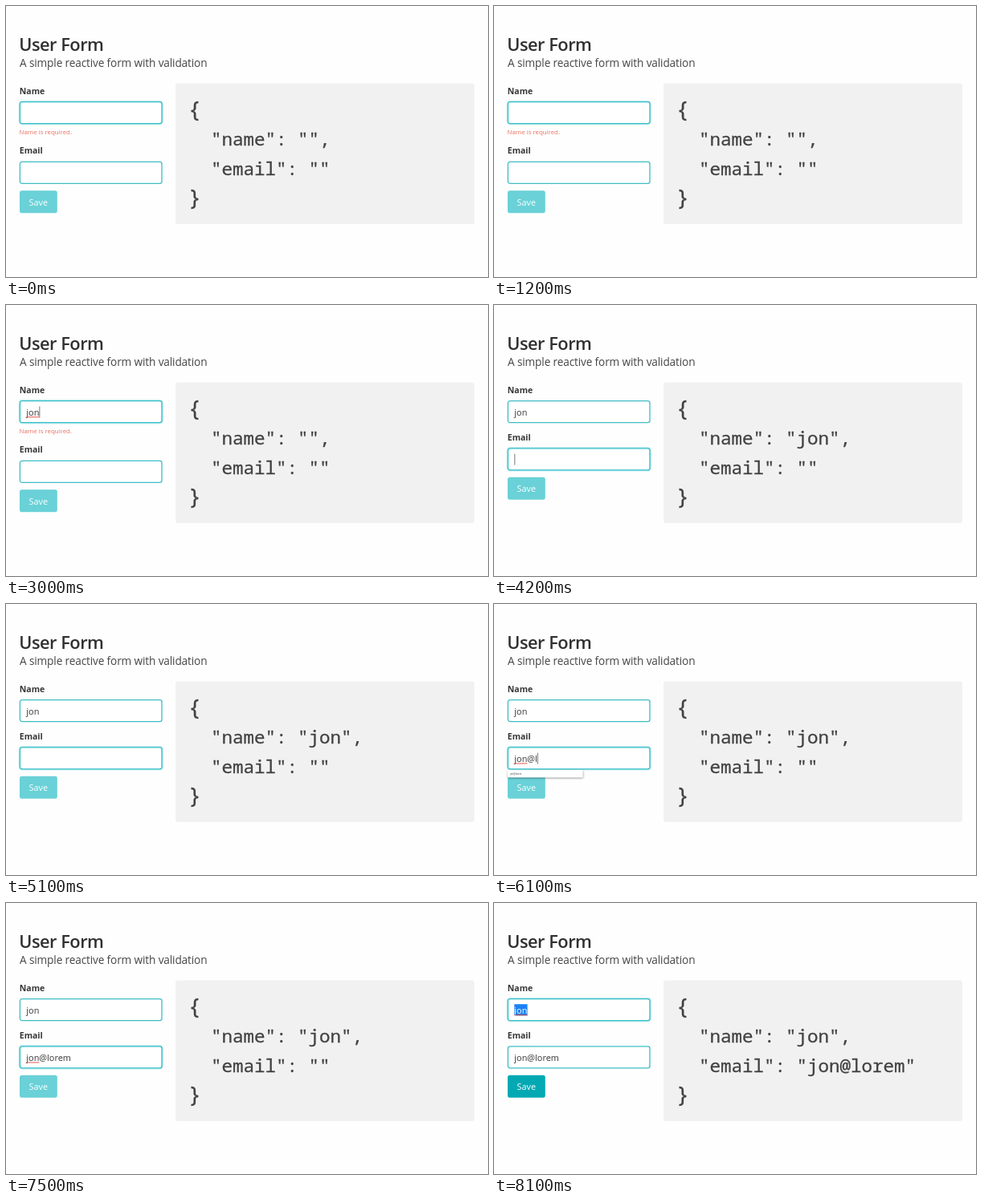
An HTML page that plays this animation: 600x338 px, repeating every 8200 ms.

```html
<!DOCTYPE html>
<html lang="en">
<head>
<meta charset="utf-8">
<title>User Form</title>
<style>
  html, body { margin: 0; width: 100%; height: 100%; overflow: hidden; background: #fefefe; }
  svg { display: block; width: 100vw; height: 100vh; }
  text { font-family: "Open Sans", "Noto Sans", sans-serif; fill: #363636; white-space: pre; }
  .title { font-size: 21.8px; font-weight: 600; letter-spacing: -0.48px; fill: #303030; }
  .subtitle { font-size: 13.6px; letter-spacing: -0.12px; fill: #454545; }
  .label { font-size: 10.5px; font-weight: 700; }
  .value { font-size: 10.9px; }
  .error { font-size: 7.9px; fill: #e8705f; }
  .save { font-size: 10.8px; fill: #fff; }
  .hint { font-size: 2.8px; }
  .code text {
    font: 22.5px "Noto Sans Mono", "DejaVu Sans Mono", monospace;
    fill: #424242; stroke: #424242; stroke-width: .3;
  }
  .code .brace { font-size: 26.5px; text-anchor: middle; }
  .box { fill: #fff; stroke: #3fbcc5; stroke-width: 1.3; }
  .ring { fill: none; stroke: #12b8c4; stroke-opacity: .24; stroke-width: 2.8; }
  .focus .box { stroke: #2fbdc7; }
  .wave { fill: none; stroke: #e0453c; stroke-width: .9; }
  .caret { stroke: #555; stroke-width: .8; }
</style>
</head>
<body>
<svg viewBox="0 0 600 338" preserveAspectRatio="none">
  <defs>
    <filter id="shadow" x="-10%" y="-50%" width="120%" height="250%">
      <feDropShadow dx=".4" dy="1" stdDeviation="1.2" flood-opacity=".5"/>
    </filter>
  </defs>
  <rect width="600" height="338" fill="#fefefe"/>
  <text class="title" x="16.2" y="55.6">User Form</text>
  <text class="subtitle" x="17" y="76.2">A simple reactive form with validation</text>

  <text class="label" x="16.8" y="109.5">Name</text>
  <g id="name" transform="translate(17 119.2)"></g>
  <text class="error" id="error" x="16.5" y="159.6">Name is required.</text>

  <g id="lower">
    <text class="label" x="16.8" y="184.4">Email</text>
    <g id="email" transform="translate(17 194)"></g>
    <rect id="button" x="17" y="230.3" width="46.8" height="28" rx="2.8"/>
    <text class="save" x="28.6" y="249">Save</text>
    <g id="popup">
      <rect x="17" y="222.8" width="93.4" height="9" fill="#fff" filter="url(#shadow)"/>
      <text class="hint" x="20" y="228.3">jon@lorem</text>
    </g>
  </g>

  <rect x="211" y="96.6" width="372" height="175.4" rx="3" fill="#f2f1f2"/>
  <g class="code">
    <text class="brace" x="234.9" y="138.5">{</text>
    <text id="nameLine" x="255" y="174.4"></text>
    <text id="emailLine" x="255" y="211"></text>
    <text class="brace" x="234.9" y="249">}</text>
  </g>
</svg>
<script>
const LOOP = 8200;
const TO_EMAIL = 3300;   // name loses focus, its value is stored
const TO_NAME = 7700;    // email loses focus, its value is stored
const BLINK = 530;
const ERROR_GAP = 15.6;
const TEXT_X = 8.3;

const nameKeys = [2500, 2600, 2800];
const emailKeys = [5500, 5600, 5700, 5900, 6050, 6250, 6400, 6500, 6700];

const $ = id => document.getElementById(id);
const show = (el, on) => el.setAttribute("visibility", on ? "inherit" : "hidden");
const typed = (word, keys, t) => word.slice(0, keys.filter(k => k <= t).length);

function wavePath(width) {
  let d = `M${TEXT_X} 20.8`;
  for (let x = 1; x <= width; x++) d += `L${TEXT_X + x} ${x % 2 ? 19.9 : 21.1}`;
  return d;
}

function makeField(id) {
  const root = $(id);
  root.innerHTML = `
    <rect class="ring" width="177.4" height="27.8" rx="3"/>
    <rect class="box" x=".4" y=".4" width="176.6" height="27" rx="2.6"/>
    <rect class="mark" x="${TEXT_X}" y="7" width="16.3" height="14.2" fill="#1a82f5"/>
    <text class="value" x="${TEXT_X}" y="18.4"></text>
    <path class="wave" d="${wavePath(16)}"/>
    <line class="caret" y1="7.2" y2="21.2"/>`;
  const part = cls => root.querySelector("." + cls);
  const [ring, mark, value, wave, caret] = ["ring", "mark", "value", "wave", "caret"].map(part);

  return ({ text, focused, selected, caretOn }) => {
    root.classList.toggle("focus", focused);
    value.textContent = text;
    value.style.fill = selected ? "#fff" : "";
    const x = TEXT_X + .5 + (text ? value.getComputedTextLength() : 0);
    caret.setAttribute("x1", x);
    caret.setAttribute("x2", x);
    show(ring, focused);
    show(mark, selected);
    show(wave, focused && text.startsWith("jon"));
    show(caret, focused && !selected && caretOn);
  };
}

const drawName = makeField("name");
const drawEmail = makeField("email");

// The caret stays lit after each key press, then blinks.
function caretLit(t, start, keys) {
  const last = keys.filter(k => k <= t).pop() ?? start;
  return t >= last && (t - last) % (2 * BLINK) < BLINK;
}

function draw(t) {
  const valid = t >= TO_EMAIL;
  const done = t >= TO_NAME;
  const email = typed("jon@lorem", emailKeys, t);

  drawName({
    text: typed("jon", nameKeys, t),
    focused: !valid || done,
    selected: done,
    caretOn: caretLit(t, 200, nameKeys)
  });
  drawEmail({
    text: email,
    focused: valid && !done,
    selected: false,
    caretOn: caretLit(t, 3120, emailKeys)
  });

  show($("error"), !valid);
  show($("popup"), email.length > 0 && email.length < 9);
  $("lower").setAttribute("transform", `translate(0 ${valid ? -ERROR_GAP : 0})`);
  $("button").setAttribute("fill", done ? "#02a9b3" : "#69d1d7");
  $("nameLine").textContent = `"name": "${valid ? "jon" : ""}",`;
  $("emailLine").textContent = `"email": "${done ? email : ""}"`;
}

const begin = performance.now();
function tick() {
  draw((performance.now() - begin) % LOOP);
  requestAnimationFrame(tick);
}
tick();
</script>
</body>
</html>
```
